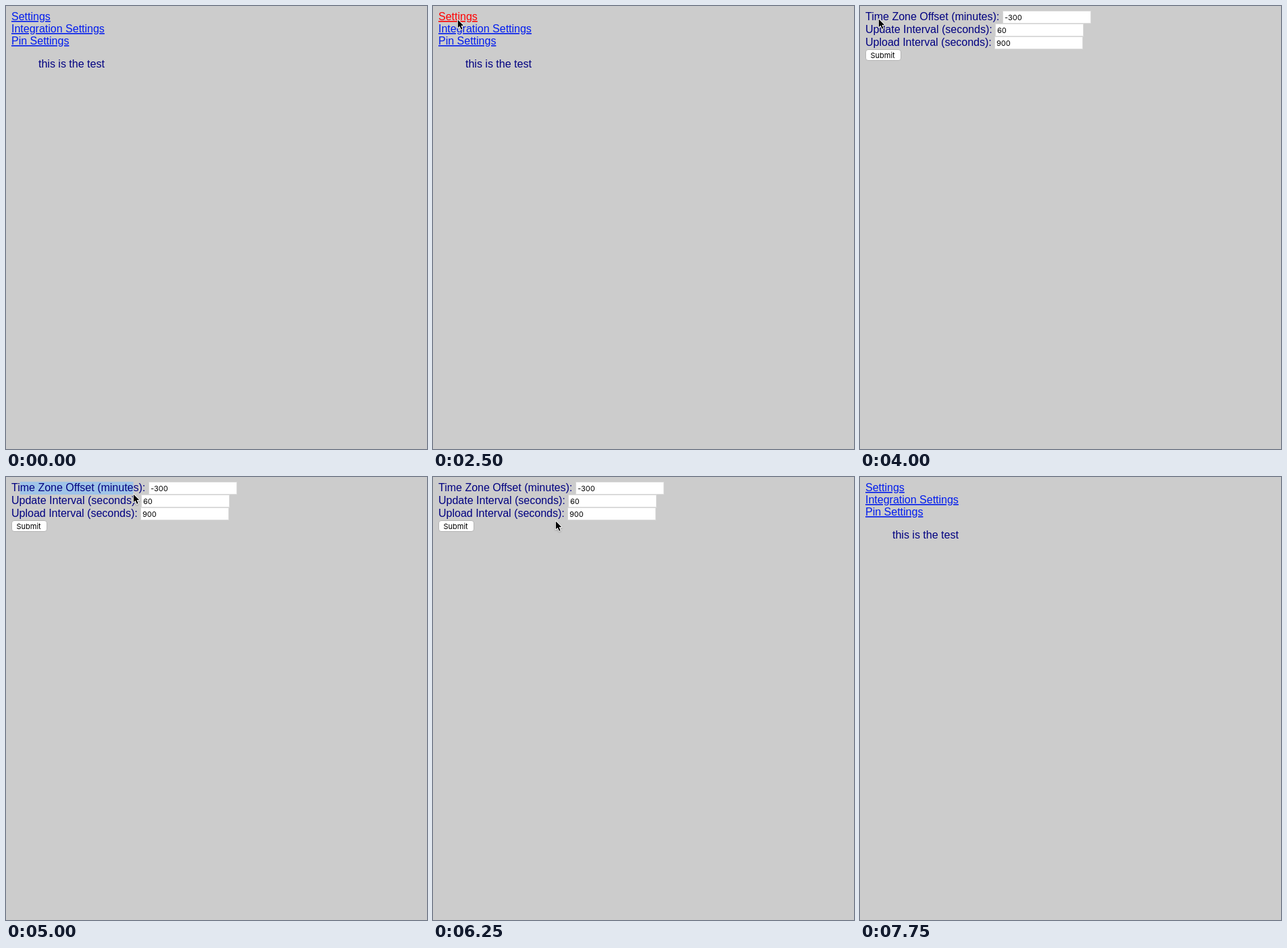
These frames come from a looping animation (623 by 655 pixels, 8000 ms). An HTML page:

```html
<!DOCTYPE html>
<html lang="en">
<head>
<meta charset="utf-8">
<style>
html, body { margin: 0; width: 100%; height: 100%; overflow: hidden; background: #ccc; }
svg { display: block; }
text { font: 16px "Liberation Sans", Arial, sans-serif; fill: #000080; white-space: pre; }
.link { fill: #001cee; text-decoration: underline 1px; text-underline-offset: 1px; }
.link.active { fill: #f00; }
.ui { font: 11px Inter, sans-serif; fill: #000; }
.field { fill: #fff; stroke: #dadada; }
.button { fill: #fff; stroke: #b4b4b4; }
.selected { fill: #9fc4e8; }
.selected-value { fill: #b3d7fa; }
#cursor { fill: #000; stroke: #fff; stroke-width: 2; paint-order: stroke; stroke-linejoin: round;
  filter: drop-shadow(0 1px 1px rgba(0, 0, 0, .25)); }
</style>
</head>
<body>
<svg width="623" height="655" viewBox="0 0 623 655">
  <g id="menu">
    <text class="link" id="settings" x="8" y="21">Settings</text>
    <text class="link" x="8" y="39">Integration Settings</text>
    <text class="link" x="8" y="57">Pin Settings</text>
    <text x="48" y="91">this is the test</text>
  </g>
  <g id="form">
    <g id="rows"></g>
    <rect class="button" x="8.5" y="64.5" width="52" height="16" rx="3.5"/>
    <text class="ui" x="15.5" y="77">Submit</text>
  </g>
  <path id="cursor" d="M.8 1.5V13.2L3.5 10.7L5.7 15.7L7.6 14.9L5.5 9.9H9.2Z"/>
</svg>
<script>
const LOOP = 8000, TICK = 250;
const LEFT = 8, TOP = 7, ROW = 19, FIELD_WIDTH = 131;
const rows = [
  ["Time Zone Offset (minutes):", "-300"],
  ["Update Interval (seconds):", "60"],
  ["Upload Interval (seconds):", "900"],
];

// Turning points of the pointer: time, x, y
const path = [
  [1000, 28, 16], [1500, 117, 18], [1750, 115, 17], [2000, 51, 18], [2250, 36, 19],
  [3000, 36, 19], [3500, 81, 15], [3750, 24, 0], [4000, 27, 18], [4500, 22, 14],
  [4750, 191, 14], [5500, 182, 44.5], [5750, 181, 64], [6500, 181, 64],
];

const byId = id => document.getElementById(id);
const show = (id, visible) => byId(id).style.display = visible ? "" : "none";
const during = (t, start, end) => t >= start && t < end;
const rect = (cls, x, y, w, h) =>
  `<rect class="${cls}" x="${x}" y="${y}" width="${w}" height="${h}"/>`;

const ruler = document.createElement("canvas").getContext("2d");
function widthOf(text, font = '16px "Liberation Sans", Arial, sans-serif') {
  ruler.font = font;
  return ruler.measureText(text).width;
}

function pointerAt(t) {
  const i = path.findIndex(point => point[0] > t);
  if (i < 1) return null;
  const [t0, x0, y0] = path[i - 1], [t1, x1, y1] = path[i];
  const u = (t - t0) / (t1 - t0);
  return { x: x0 + (x1 - x0) * u, y: y0 + (y1 - y0) * u };
}

// Right edge of the character under x
function characterEnd(label, x) {
  let count = 0;
  while (count < label.length && LEFT + widthOf(label.slice(0, count)) < x) count++;
  return LEFT + widthOf(label.slice(0, count));
}

function rowMarkup([label, value], i, drag) {
  const top = TOP + ROW * i, baseline = top + 14;
  const fieldX = Math.round(LEFT + widthOf(label + " "));
  const start = i ? LEFT : LEFT + widthOf("Ti");
  const lastRow = drag ? Math.floor((drag.y - TOP) / ROW) : -1;
  const whole = i < lastRow;
  let out = "";
  if (i <= lastRow) {
    const end = whole ? fieldX + FIELD_WIDTH + 9 : characterEnd(label, drag.x);
    out += rect("selected", start, top, end - start, ROW);
  }
  out += `<text x="${LEFT}" y="${baseline}">${label}</text>`;
  out += rect("field", fieldX + .5, top + .5, FIELD_WIDTH - 1, ROW - 1);
  if (whole) {
    out += rect("selected-value", fieldX + 3, top + 3, widthOf(value, "11px Inter, sans-serif") + 2, 14);
  }
  return out + `<text class="ui" x="${fieldX + 3}" y="${baseline}">${value}</text>`;
}

let lastTick;
function draw() {
  const t = Math.floor(performance.now() % LOOP / TICK) * TICK;
  if (t !== lastTick) {
    lastTick = t;
    const pointer = pointerAt(t);
    const onForm = during(t, 2750, 7750);
    const drag = during(t, 4750, 6250) ? pointer : null;
    show("form", onForm);
    show("menu", !onForm);
    show("cursor", pointer);
    byId("settings").classList.toggle("active", during(t, 2500, 2750));
    byId("rows").innerHTML = rows.map((row, i) => rowMarkup(row, i, drag)).join("");
    if (pointer) byId("cursor").setAttribute("transform", `translate(${pointer.x} ${pointer.y})`);
  }
  requestAnimationFrame(draw);
}
draw();
</script>
</body>
</html>
```
